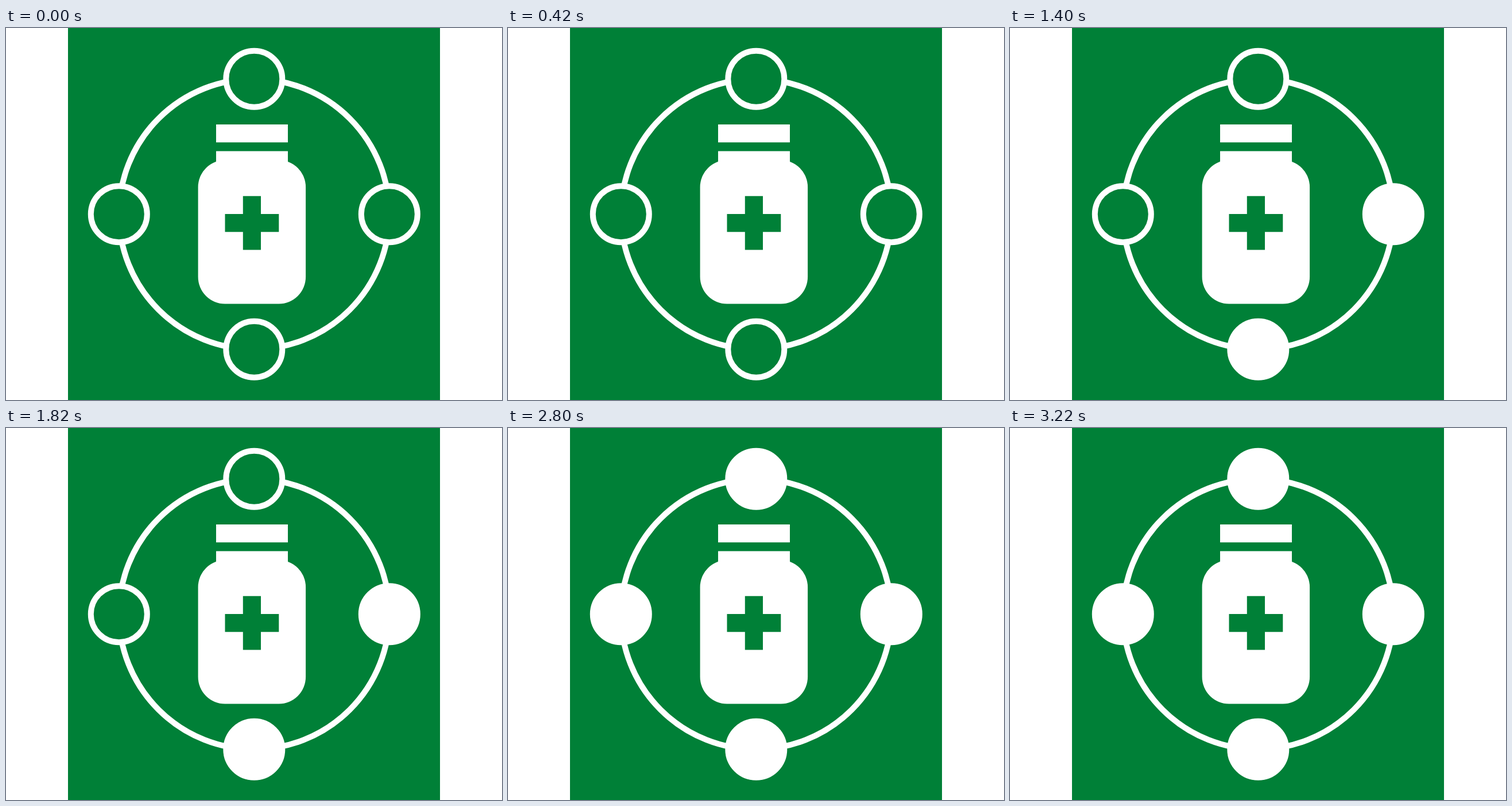
Animation of 864x648 px, one loop 3.5 s. Source, as an HTML page:

```html
<!DOCTYPE html>
<html lang="en">
<head>
<meta charset="utf-8">
<title>Medicine bottle progress</title>
<style>
  html, body { margin: 0; width: 100%; height: 100%; overflow: hidden; background: #fff; }
  svg { display: block; width: 864px; height: 648px; }
  .ring { stroke: #fff; stroke-width: 10; }
</style>
</head>
<body>
<svg viewBox="0 0 864 648" fill="#fff">
  <rect x="108" width="648" height="648" fill="#008037"/>
  <circle class="ring" cx="432.3" cy="324.2" r="235.5" fill="none"/>
  <g id="nodes">
    <circle class="ring" cx="432.3" cy="559.7" r="49"/>
    <circle class="ring" cx="667.8" cy="324.2" r="49"/>
    <circle class="ring" cx="432.3" cy="88.7" r="49"/>
    <circle class="ring" cx="196.8" cy="324.2" r="49"/>
  </g>
  <path d="M366 168h125v31.2h-125zM366 214.6h125v40h-125z"/>
  <rect x="334.6" y="230.3" width="187.5" height="250.2" rx="46.9"/>
  <path fill="#008037" d="M412.8 292.8h31.2v31.3h31.3v31.2h-31.3v31.3h-31.2v-31.3h-31.3v-31.2h31.3z"/>
</svg>
<script>
  const STEP = 700;
  const nodes = [...document.querySelectorAll('#nodes circle')];
  const start = performance.now();

  function draw() {
    const filled = Math.floor((performance.now() - start) / STEP) % (nodes.length + 1);
    nodes.forEach((node, i) => node.setAttribute('fill', i < filled ? '#fff' : '#008037'));
    requestAnimationFrame(draw);
  }
  draw();
</script>
</body>
</html>
```
